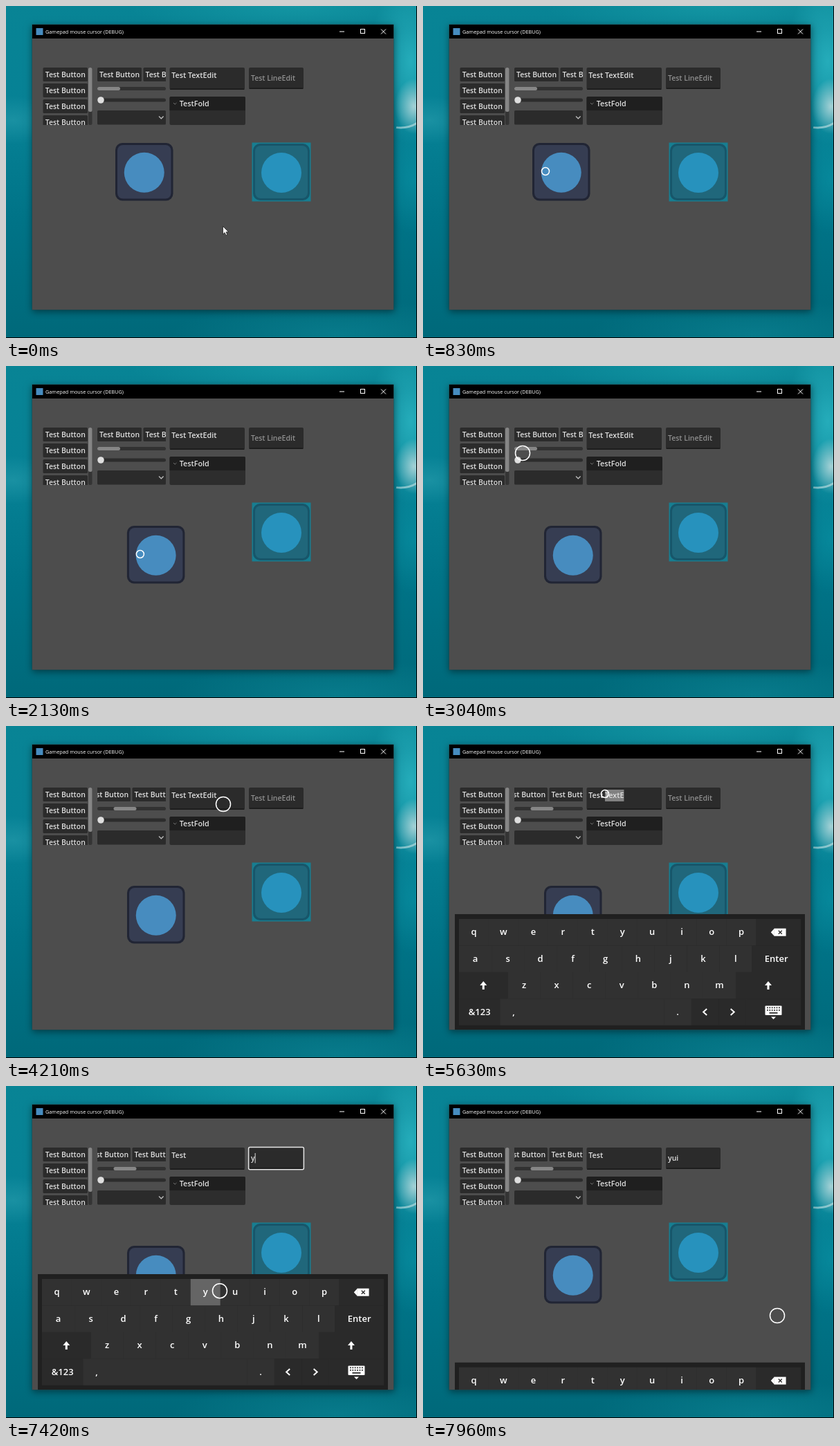
An HTML page with a canvas for the animation above (8000 ms loop, 594 by 480 pixels).

```html
<!DOCTYPE html>
<html lang="en">
<head>
<meta charset="utf-8">
<title>Gamepad mouse cursor</title>
<style>
html, body { margin: 0; width: 100%; height: 100%; overflow: hidden; background: #00697b; }
canvas { display: block; width: 594px; height: 480px; }
</style>
</head>
<body>
<canvas id="stage" width="594" height="480"></canvas>
<script>
const LOOP = 8000;
const ctx = document.getElementById('stage').getContext('2d');
const UI = '"Open Sans", "Noto Sans", sans-serif';
const LABEL = `600 10.5px ${UI}`;
const EDIT = `600 10.75px ${UI}`;
const KEY = `600 13px ${UI}`;
const INK = '#e0e0e0', DARK = '#2b2b2b';

const clamp = v => Math.max(0, Math.min(1, v));
const smooth = v => { v = clamp(v); return v * v * (3 - 2 * v); };
const ramp = (t, start, length) => clamp((t - start) / length);

// ---- Drawing helpers ----

function box(x, y, w, h, color, r = 0) {
  ctx.fillStyle = color;
  ctx.beginPath();
  ctx.roundRect(x, y, w, h, r);
  ctx.fill();
}

function disc(x, y, r, color) {
  ctx.fillStyle = color;
  ctx.beginPath();
  ctx.arc(x, y, r, 0, Math.PI * 2);
  ctx.fill();
}

function poly(points, color) {
  ctx.fillStyle = color;
  ctx.beginPath();
  points.forEach(p => ctx.lineTo(...p));
  ctx.fill();
}

function line(points, color, width) {
  ctx.strokeStyle = color;
  ctx.lineWidth = width;
  ctx.beginPath();
  points.forEach(p => ctx.lineTo(...p));
  ctx.stroke();
}

function text(str, x, y, { font = LABEL, color = INK, align = 'left' } = {}) {
  ctx.font = font;
  ctx.fillStyle = color;
  ctx.textAlign = align;
  ctx.fillText(str, x, y);
}

function clipped(x, y, w, h, draw) {
  ctx.save();
  ctx.beginPath();
  ctx.rect(x, y, w, h);
  ctx.clip();
  draw();
  ctx.restore();
}

function glow(x, y, rx, ry, rgb, alpha) {
  ctx.save();
  ctx.translate(x, y);
  ctx.scale(rx, ry);
  const g = ctx.createRadialGradient(0, 0, 0, 0, 0, 1);
  g.addColorStop(0, `rgba(${rgb},${alpha})`);
  g.addColorStop(1, `rgba(${rgb},0)`);
  ctx.fillStyle = g;
  ctx.fillRect(-1, -1, 2, 2);
  ctx.restore();
}

// ---- Keyboard layout: widths are spans of an evenly divided row ----

const BOARD = { x: 52, y: 279, w: 494, h: 38.4, travel: 168 };
const letters = str => [...str].map(face => ({ face, span: 1 }));
const special = (face, span) => ({ face, span, shaded: true });

const keys = [
  [...letters('qwertyuiop'), special(backspace, 1.5)],
  [...letters('asdfghjkl'), special('Enter', 1.5)],
  [special(upArrow, 1.5), ...letters('zxcvbnm'), special(upArrow, 2)],
  [special('&123', 1.5), ...letters(','), { face: '', span: 5 }, ...letters('.'),
   special(leftArrow, 1), special(rightArrow, 1), special(hideIcon, 2)]
].flatMap((row, r) => {
  const unit = BOARD.w / row.reduce((sum, key) => sum + key.span, 0);
  let x = BOARD.x;
  return row.map(key => {
    const placed = { ...key, x, y: BOARD.y + r * BOARD.h, w: key.span * unit };
    x += placed.w;
    return placed;
  });
});

function aim(face) {
  const key = keys.find(k => k.face === face);
  return [key.x + key.w / 2, key.y + BOARD.h / 2 - 2];
}

// ---- Story: the cursor glides to each spot, arrives at t and acts there ----

const DWELL = 50;
const go = (t, spot, act = '') => ({ t, spot, act });
const tapKey = (t, face) => ({ ...go(t, aim(face), 'tap'), face });

const home = [313, 319];
const grabIcon = go(790, [177, 239], 'grab');
const dropIcon = go(2150, [194, 272], 'drop');
const grabBar = go(3190, [148, 120], 'grab');
const dropBar = go(3640, [171.5, 120], 'drop');
const tapText = go(4300, [314, 113], 'tap');
const grabText = go(5430, [291, 99], 'grab');
const dropText = go(5630, [263, 98], 'drop');
const cutText = tapKey(6180, backspace);
const tapLine = go(6750, [390, 104], 'tap');
const tapHide = tapKey(7750, hideIcon);

const steps = [
  go(200, home), grabIcon, go(1330, [124, 268]), dropIcon, go(3040, [144, 126]),
  grabBar, dropBar, go(4210, tapText.spot), tapText,
  ...[0, 1, 2].map(i => tapKey(4920 + i * 100, backspace)),
  grabText, dropText, cutText, tapLine,
  ...[...'yui'].map((c, i) => tapKey(7310 + 200 * i - 25 * i * i, c)),
  tapHide, go(7960, [512, 332]), go(LOOP, [513, 324])
];

const tapped = (t, test) => steps.filter(s => s.face && s.t <= t && test(s));
const during = (t, from, to) => t >= from.t && t < to.t;

function cursorAt(t) {
  const i = steps.findIndex(s => s.t > t);
  if (i < 1) return home;
  const from = steps[i - 1], to = steps[i];
  const leave = from.t + (from.act ? DWELL : 0);
  const k = smooth(ramp(t, leave, to.t - leave));
  return from.spot.map((v, axis) => v + (to.spot[axis] - v) * k);
}

function pressAt(t) {
  const holds = steps.map((s, i) => {
    if (s.act === 'tap') return [s.t, s.t + DWELL];
    if (s.act === 'grab') return [s.t, steps.slice(i).find(d => d.act === 'drop').t + DWELL];
    return [LOOP * 2, LOOP * 2];
  });
  return Math.max(...holds.map(([down, up]) => Math.min(ramp(t, down - 30, 30), 1 - ramp(t, up, 40))));
}

// ---- Scene ----

function wallpaper() {
  const g = ctx.createLinearGradient(0, 0, 0, 480);
  g.addColorStop(0, '#088495');
  g.addColorStop(0.35, '#068195');
  g.addColorStop(0.65, '#007387');
  g.addColorStop(1, '#00697a');
  ctx.fillStyle = g;
  ctx.fillRect(0, 0, 594, 480);
  glow(420, 0, 240, 50, '30,165,175', 0.5);
  glow(585, 80, 60, 120, '50,190,202', 0.7);
  glow(10, 165, 60, 35, '45,160,175', 0.5);
  glow(590, 250, 50, 80, '10,150,168', 0.5);
  glow(480, 475, 240, 50, '15,140,155', 0.5);
  glow(590, 145, 28, 40, '190,220,222', 0.85);
  ctx.strokeStyle = 'rgba(200,228,230,0.6)';
  ctx.lineWidth = 3;
  ctx.beginPath();
  ctx.arc(570, 130, 46, 0.2, 1.7);
  ctx.stroke();
  box(593, 0, 1, 480, '#000');
  box(0, 479, 594, 1, '#000');
}

function windowFrame() {
  ctx.save();
  ctx.shadowColor = 'rgba(0,0,0,0.45)';
  ctx.shadowBlur = 10;
  ctx.shadowOffsetY = 2;
  box(37.5, 26.5, 523, 413, '#26474d');
  ctx.restore();
  box(38, 27, 522, 20, '#000');
  box(38, 47, 522, 392, '#4d4d4d');
  box(43.5, 32, 10, 10, '#478cbf');
  text('Gamepad mouse cursor (DEBUG)', 57, 40, { font: `400 7.3px ${UI}`, color: '#fff' });
  line([[482, 37], [489, 37]], '#fff', 1);
  ctx.strokeRect(512.5, 33.5, 6, 6);
  line([[542, 33.5], [549, 40.5]], '#fff', 1);
  line([[549, 33.5], [542, 40.5]], '#fff', 1);
}

function testButton(x, y, w) {
  box(x, y, w, 20, DARK, 1.5);
  text('Test Button', x + w / 2, y + 14, { align: 'center' });
}

function lists(t, cx) {
  clipped(53, 88, 66, 84, () => {
    for (let i = 0; i < 4; i++) testButton(53.5, 89 + i * 23, 64.5);
  });
  box(119, 89, 5.5, 83, '#343434', 2.5);
  box(119, 89, 5.5, 64, '#868686', 2.5);

  const reach = dropBar.spot[0] - grabBar.spot[0];
  const drag = t < grabBar.t ? 0 : t < dropBar.t ? cx - grabBar.spot[0] : reach;
  clipped(132, 88, 99, 22, () => {
    const left = 132 - drag * 0.68;
    testButton(left, 89, 64);
    testButton(left + 66.5, 89, 64);
  });
  box(132, 117, 99, 5, '#313131', 2.5);
  box(132 + drag, 117, 33, 5, '#868686', 2.5);
  box(132, 133.5, 99, 5, '#2c2c2c', 2.5);
  disc(137, 136, 4.8, '#dedede');
  box(132, 151, 99, 20.5, DARK, 1.5);
  line([[221, 159.5], [224.3, 162.8], [227.6, 159.5]], '#bdbdbd', 1.3);
}

function field(x, y, w, h) {
  box(x, y, w, h, DARK, 2);
  box(x + 0.5, y + h - 1.5, w - 1, 1.5, '#191919', 1);
}

function textEdit(t, cx) {
  field(236.5, 89, 108.5, 32);
  const full = 'Test TextEdit', word = 5;
  const erased = tapped(t, s => s.face === backspace && s !== cutText).length;
  const end = t < cutText.t ? full.length - erased : word;
  ctx.font = EDIT;
  const edge = n => 239.2 + ctx.measureText(full.slice(0, n)).width;
  if (during(t, grabText, cutText)) {
    const reach = t < dropText.t ? cx + 2 : edge(word);
    let from = end;
    while (from > word && edge(from) > reach) from--;
    box(edge(from), 92, edge(end) - edge(from), 17, '#818181');
  }
  text(full.slice(0, end), 239.2, 104.4, { font: EDIT });
}

function lineEdit(t) {
  const focused = during(t, tapLine, tapHide);
  const typed = tapped(t, s => typeof s.face === 'string').map(s => s.face).join('');
  field(351, 89, 79, 31);
  if (focused) {
    ctx.strokeStyle = '#e6e6e6';
    ctx.lineWidth = 1.5;
    ctx.beginPath();
    ctx.roundRect(350.6, 88.4, 79.8, 32.4, 2);
    ctx.stroke();
  }
  text(typed || 'Test LineEdit', 354, 108.3, { color: typed ? INK : '#8f8f8f' });
  if (focused) {
    const x = 354.5 + ctx.measureText(typed).width;
    line([[x, 97], [x, 111.5]], '#dcdcdc', 1);
  }
}

function fold() {
  box(236.5, 131, 109.5, 41, '#2d2d2d', 2);
  box(236.5, 131, 109.5, 20, '#1f1f1f', [2, 2, 0, 0]);
  line([[242, 140], [244.2, 142.2], [246.4, 140]], '#777', 1);
  text('TestFold', 250.7, 145.4, { font: EDIT });
}

function tile(x, y, size, edge, fill, dot) {
  box(x, y, size, size, edge, 10);
  box(x + 3, y + 3, size - 6, size - 6, fill, 8);
  disc(x + size / 2, y + size / 2 + 1, 29, dot);
}

function sprites(t, cx, cy) {
  const [gx, gy] = grabIcon.spot;
  const [x, y] = t < grabIcon.t ? grabIcon.spot : t < dropIcon.t ? [cx, cy] : dropIcon.spot;
  tile(158 + x - gx, 198 + y - gy, 83.5, '#212534', '#363d52', '#478cbf');
  box(355.5, 197.5, 85, 85, '#177e91');
  tile(357, 199, 82, '#17566a', '#20677b', '#2792bd');
}

function upArrow(x, y) {
  poly([[x - 5, y], [x, y - 6], [x + 5, y]], '#fff');
  box(x - 1.5, y - 1, 3, 7, '#fff');
}

function chevron(x, y, dir) {
  line([[x - 2.5 * dir, y - 4.5], [x + 2.5 * dir, y], [x - 2.5 * dir, y + 4.5]], '#fff', 2);
}

function leftArrow(x, y) { chevron(x, y, -1); }
function rightArrow(x, y) { chevron(x, y, 1); }

function backspace(x, y) {
  poly([[x - 11, y], [x - 6, y - 5.5], [x - 6, y + 5.5]], '#fff');
  box(x - 6.2, y - 5.5, 17, 11, '#fff');
  for (const d of [-2.5, 2.5]) line([[x, y - d], [x + 5, y + d]], DARK, 1.3);
}

function hideIcon(x, y) {
  box(x - 12, y - 9, 24, 13.5, '#fff', 1);
  for (let i = 0; i < 12; i++)
    box(x - 9.5 + (i % 6) * 3.4, y - 7 + Math.floor(i / 6) * 3.5, 1.8, 1.8, DARK);
  box(x - 6, y + 0.5, 12, 1.8, DARK);
  poly([[x - 3.5, y + 7], [x + 3.5, y + 7], [x, y + 10.5]], '#fff');
}

function keyboard(t, cx, cy) {
  const shown = smooth(ramp(t, tapText.t + 100, 250));
  const hidden = smooth(ramp(t, tapHide.t + 20, 280));
  if (!shown) return;
  const shift = (1 - shown + hidden) * BOARD.travel;
  box(46, 272 + shift, 506, BOARD.travel, '#202020');
  for (const { face, x, y: rest, w, shaded } of keys) {
    const y = rest + shift;
    const hover = cx >= x && cx < x + w && cy >= y && cy < y + BOARD.h;
    box(x, y, w + 0.2, BOARD.h + 0.2, hover ? '#656565' : shaded ? '#2a2a2a' : '#313131');
    const mx = x + w / 2, my = y + BOARD.h / 2;
    if (typeof face === 'function') face(mx, my);
    else text(face, mx, my + 4.2, { font: KEY, color: '#fff', align: 'center' });
  }
}

function arrow(x, y) {
  const shape = [[0, 0], [0, 11.5], [2.6, 9], [4.4, 13], [6.3, 12.2], [4.6, 8.3], [8.2, 8.2]]
    .map(([dx, dy]) => [x + 0.5 + dx, y - 0.5 + dy]);
  poly(shape, '#fff');
  line([...shape, shape[0]], '#111', 0.7);
}

function ring(x, y, press) {
  ctx.strokeStyle = '#fff';
  ctx.lineWidth = 1.5;
  ctx.beginPath();
  ctx.arc(x, y, 10.5 - 5 * press, 0, Math.PI * 2);
  ctx.stroke();
}

function draw(t) {
  const [x, y] = cursorAt(t);
  wallpaper();
  windowFrame();
  clipped(38, 47, 522, 392, () => {
    lists(t, x);
    textEdit(t, x);
    lineEdit(t);
    fold();
    sprites(t, x, y);
    keyboard(t, x, y);
    if (t < steps[0].t) arrow(x, y);
    else ring(x, y, pressAt(t));
  });
}

const start = performance.now();
function tick() {
  draw((performance.now() - start) % LOOP);
  requestAnimationFrame(tick);
}
tick();
</script>
</body>
</html>
```
